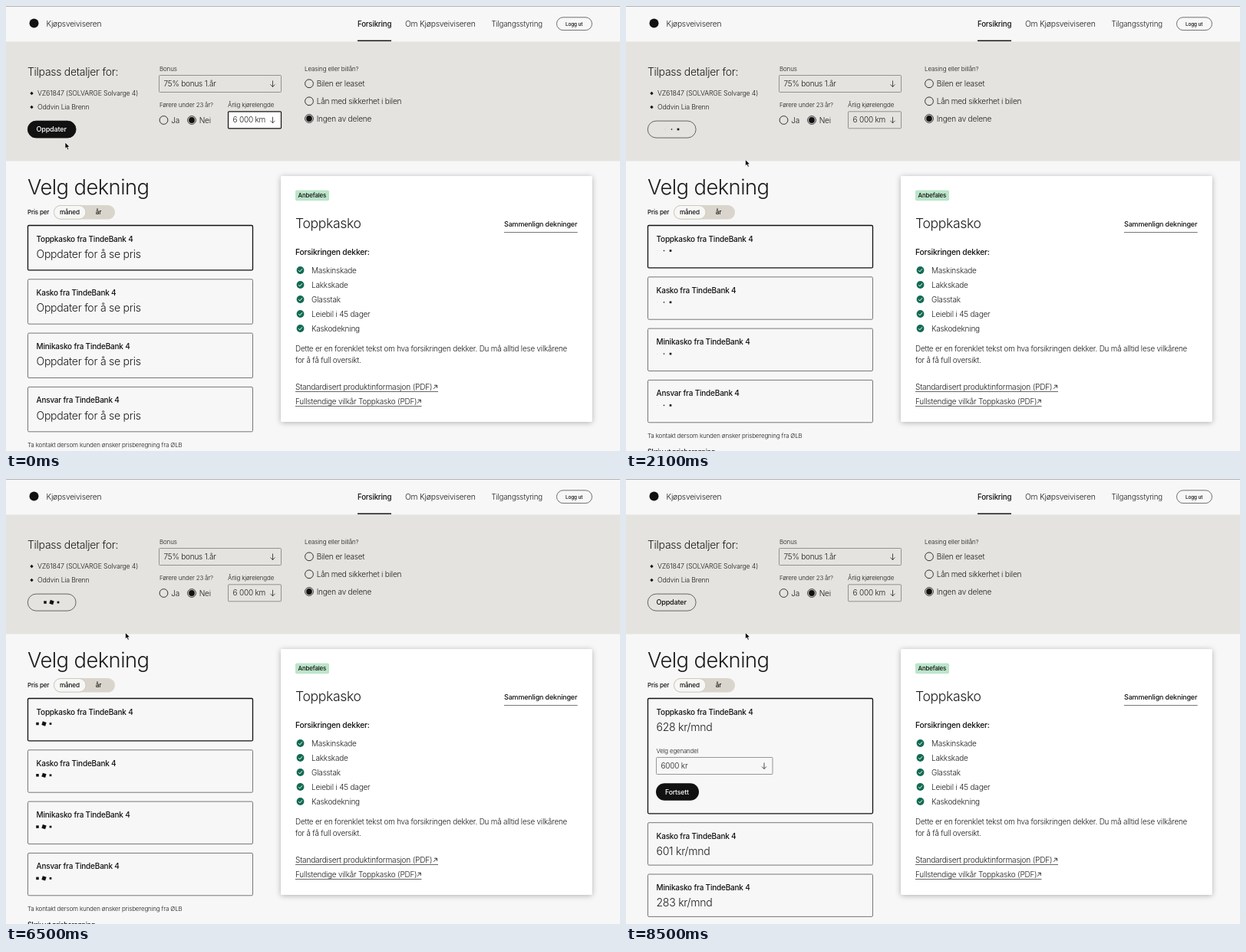
An HTML page that plays this animation: 800x581 px, repeating every 8.6 s.

```html
<!DOCTYPE html>
<html lang="no">
<head>
<meta charset="utf-8">
<title>Velg dekning</title>
<style>
  html, body { margin: 0; width: 100%; height: 100%; overflow: hidden; background: #f7f7f7; }
  svg { display: block; width: 800px; height: 581px; }
  text {
    font-family: Inter, "Liberation Sans", sans-serif; font-weight: 300; font-optical-sizing: none;
    letter-spacing: -.02em; fill: #1c1c1c; white-space: pre;
  }
  .b { font-weight: 500; fill: #111; }
</style>
</head>
<body>
<svg id="stage" viewBox="0 0 800 581">
  <defs>
    <filter id="shadow" x="-10%" y="-10%" width="120%" height="120%">
      <feDropShadow dx="0" dy="1" stdDeviation="3.6" flood-opacity=".3"/>
    </filter>
    <clipPath id="open"><rect id="openBox" x="28" y="286.5" width="294"/></clipPath>
  </defs>
  <g id="base"></g>
  <g id="live"></g>
</svg>
<script>
const INK = '#111', GREY = '#777', LOOP = 8600;
const CLICK = 300, LOADED = 7000, SETTLED = 7700;
const $ = id => document.getElementById(id);

// Drawing helpers; y of a text is its baseline
const text = (x, y, s, size = 10, cls = '', fill = '') =>
  `<text x="${x}" y="${y}" font-size="${size}" class="${cls}"${fill && ` style="fill:${fill}"`}>${s}</text>`;
const bold = (x, y, s, size, fill) => text(x, y, s, size, 'b', fill);
const box = (x, y, w, h, r, fill, stroke = 'none', sw = 1) =>
  `<rect x="${x}" y="${y}" width="${w}" height="${h}" rx="${r}" fill="${fill}" stroke="${stroke}" stroke-width="${sw}"/>`;
const path = (d, stroke = INK, sw = 1) =>
  `<path d="${d}" fill="none" stroke="${stroke}" stroke-width="${sw}"/>`;
const disc = (x, y, r, fill, stroke = 'none') =>
  `<circle cx="${x}" cy="${y}" r="${r}" fill="${fill}" stroke="${stroke}" stroke-width=".9"/>`;
const downArrow = (x, y) => path(`M${x} ${y - 4}v8m-3-3l3 3l3-3`, '#222', .8);
const outArrow = (x, y) => path(`M${x} ${y}l4.6-4.6m-3.6 0h3.6v3.6`, '#222', .9);
const radio = (x, y, label, on) =>
  disc(x, y, 5.4, 'none', '#222') + (on ? disc(x, y, 3.9, INK) : '') + text(x + 9.7, y + 3.7, label);
const select = (x, y, w, label, focus) =>
  box(x, y, w, 22, 1, focus ? '#fff' : 'none', focus ? INK : GREY, focus ? 1.2 : .75) +
  text(x + 6, y + 14.6, label) + downArrow(x + w - 11, y + 11);

function drawBase() {
  const bullets = ['VZ61847 (SOLVARGE Solvarge 4)', 'Oddvin Lia Brenn'];
  const covers = ['Maskinskade', 'Lakkskade', 'Glasstak', 'Leiebil i 45 dager', 'Kaskodekning'];
  return [
    box(0, 0, 800, 1, 0, '#b4b4b4'),
    disc(36.5, 22.5, 6, INK),
    text(52.5, 26.7, 'Kjøpsveiviseren', 10.2),
    bold(458, 26.7, 'Forsikring', 9.7),
    box(458, 44.6, 44, 1.6, 0, INK),
    text(520, 26.7, 'Om Kjøpsveiviseren', 10.3),
    text(632.5, 26.7, 'Tilgangsstyring', 9.7),
    box(717.5, 14.8, 46, 16.8, 8.4, 'none', '#444', .75),
    bold(729, 25.6, 'Logg ut', 6.4),

    box(0, 46.5, 800, 156, 0, '#e4e3df'),
    text(28, 91, 'Tilpass detaljer for:', 14),
    ...bullets.map((s, i) => {
      const y = 114 + 18 * i;
      return `<path d="M33.5 ${y - 2.2}l2.2 2.2l-2.2 2.2l-2.2-2.2z" fill="${INK}"/>` + text(41, y + 3, s, 8.8);
    }),
    text(200, 85, 'Bonus', 8),
    select(199.5, 90.5, 159, '75% bonus 1.år'),
    text(200, 132, 'Førere under 23 år?', 7.95),
    text(289, 132, 'Årlig kjørelengde', 8),
    radio(205.5, 149, 'Ja'), radio(242, 149, 'Nei', true),
    text(389, 85, 'Leasing eller billån?', 8.1),
    radio(395, 101.3, 'Bilen er leaset'),
    radio(395, 124.3, 'Lån med sikkerhet i bilen'),
    radio(395, 147, 'Ingen av delene', true),

    text(28, 246, 'Velg dekning', 27.3),
    bold(28, 272, 'Pris per', 8),
    box(62, 260, 80, 18.6, 9.3, '#dad5cc'),
    box(62.5, 260.5, 41.5, 17.6, 8.8, '#f7f7f6', '#c8c2b7', .8),
    bold(70, 272, 'måned', 8.2), bold(116.7, 272, 'år', 8.2),

    `<g filter="url(#shadow)">${box(358, 222, 405.7, 321, 2, '#fff')}</g>`,
    box(377, 240.6, 44, 13.6, 2, '#bbe5ca'),
    bold(380.5, 250.3, 'Anbefales', 7.9),
    text(377, 290.3, 'Toppkasko', 17.6),
    bold(649, 287.9, 'Sammenlign dekninger', 9),
    path('M649 295.5h95.7', '#555', .8),
    bold(377, 325, 'Forsikringen dekker:', 10.3),
    ...covers.map((s, i) => {
      const y = 345 + 19 * i;
      return disc(383.5, y, 4.9, '#126b52') +
        path(`M381.2 ${y + .2}l1.7 1.7l3-3.6`, '#fff', 1) + text(398, y + 3.8, s);
    }),
    text(377, 451, 'Dette er en forenklet tekst om hva forsikringen dekker. Du må alltid lese vilkårene', 9.9),
    text(377, 466, 'for å få full oversikt.', 9.9),
    text(377, 500.7, 'Standardisert produktinformasjon (PDF)', 10.13),
    outArrow(557, 499.8), path('M377 503.5h186', '#333', .75),
    text(377, 519.7, 'Fullstendige vilkår Toppkasko (PDF)', 9.97),
    outArrow(535.7, 518.8), path('M377 522.5h164.5', '#333', .75)
  ].join('');
}

// Three squares that swell and shrink one after the other
function dots(x, y, t) {
  const period = 2570, lag = 280, peak = 6500 - 2 * period;
  let out = '';
  for (let i = 0; i < 3; i++) {
    const since = t - peak - (i - 1) * lag;
    const wrapped = ((since + 700) % period + period) % period - 700;
    const u = wrapped / lag;
    const scale = u < 0 ? Math.max(0, 1 + u / 2.2) : Math.max(0, 1 - u / 4.2) ** 1.3;
    const turn = 18 * Math.max(0, 1 - Math.abs(u) * 2), size = 5 * scale;
    out += `<g transform="translate(${x + 8.5 * i} ${y}) rotate(${turn})">` +
      box(-size / 2, -size / 2, size, size, 0, INK) + '</g>';
  }
  return out;
}

function cards(t) {
  const idle = t < CLICK, loading = !idle && t < LOADED;
  const height = idle ? 58.4 : 55.4;
  const left = Math.max(0, 1 - (t - LOADED) / (SETTLED - LOADED)) ** 8;
  const names = ['Toppkasko', 'Kasko', 'Minikasko', 'Ansvar'], prices = [628, 601, 283, 214];
  let y = 286.5, out = '';
  names.forEach((name, i) => {
    const first = i === 0;
    const h = first && !idle && !loading ? 150.3 - 95 * left : height;
    out += box(28.5, y, 293, h, 1.5, 'none', first ? INK : GREY, first ? 1.3 : 1);
    out += bold(39.5, y + 21, `${name} fra TindeBank 4`, 10);
    out += loading ? dots(41, y + 33, t)
      : text(39.5, y + 42.2, idle ? 'Oppdater for å se pris' : `${prices[i]} kr/mnd`, 14.1);
    if (first && t >= LOADED) {
      $('openBox').setAttribute('height', h);
      out += '<g clip-path="url(#open)">' + text(39.5, 358, 'Velg egenandel', 7.9) +
        select(39.5, 363.5, 151.5, '6000 kr') +
        box(39, 397.2, 56, 22.6, 11.3, INK) + bold(51, 411.6, 'Fortsett', 8.7, '#fff') + '</g>';
    }
    y += h + 11.9;
  });
  return out + text(28, y + 8.2, 'Ta kontakt dersom kunden ønsker prisberegning fra ØLB', 8) +
    bold(28, y + 29, 'Skriv ut prisberegning', 8.7);
}

function button(t) {
  const idle = t < CLICK;
  return box(28.3, 150.1, 62.8, 22, 11, idle ? INK : 'none', idle ? INK : '#444', .8) +
    (idle || t >= LOADED ? bold(39.5, 164.3, 'Oppdater', 9.05, idle ? '#fff' : INK) : dots(51, 161, t));
}

function cursor(t) {
  const ease = u => u * u * (3 - 2 * u);
  const mix = (a, b, u) => a + (b - a) * ease(Math.min(1, Math.max(0, u)));
  const up = t / 250, away = (t - 350) / 550;
  const x = mix(mix(77, 68, up), 155.5, away), y = mix(mix(178, 163, up), 200.5, away);
  return `<path transform="translate(${x} ${y})" d="M0 0v8.3l1.9-1.7l1.4 3.2l1.5-.7l-1.4-3h2.6z"
    fill="#000" stroke="#fff" stroke-width=".7"/>`;
}

function frame(now) {
  const t = Math.floor(now % LOOP / 100) * 100;
  $('live').innerHTML = select(289.5, 137.8, 69, '6 000 km', t < CLICK) + button(t) + cards(t) + cursor(t);
  requestAnimationFrame(frame);
}

$('base').innerHTML = drawBase();
frame(performance.now());
</script>
</body>
</html>
```
